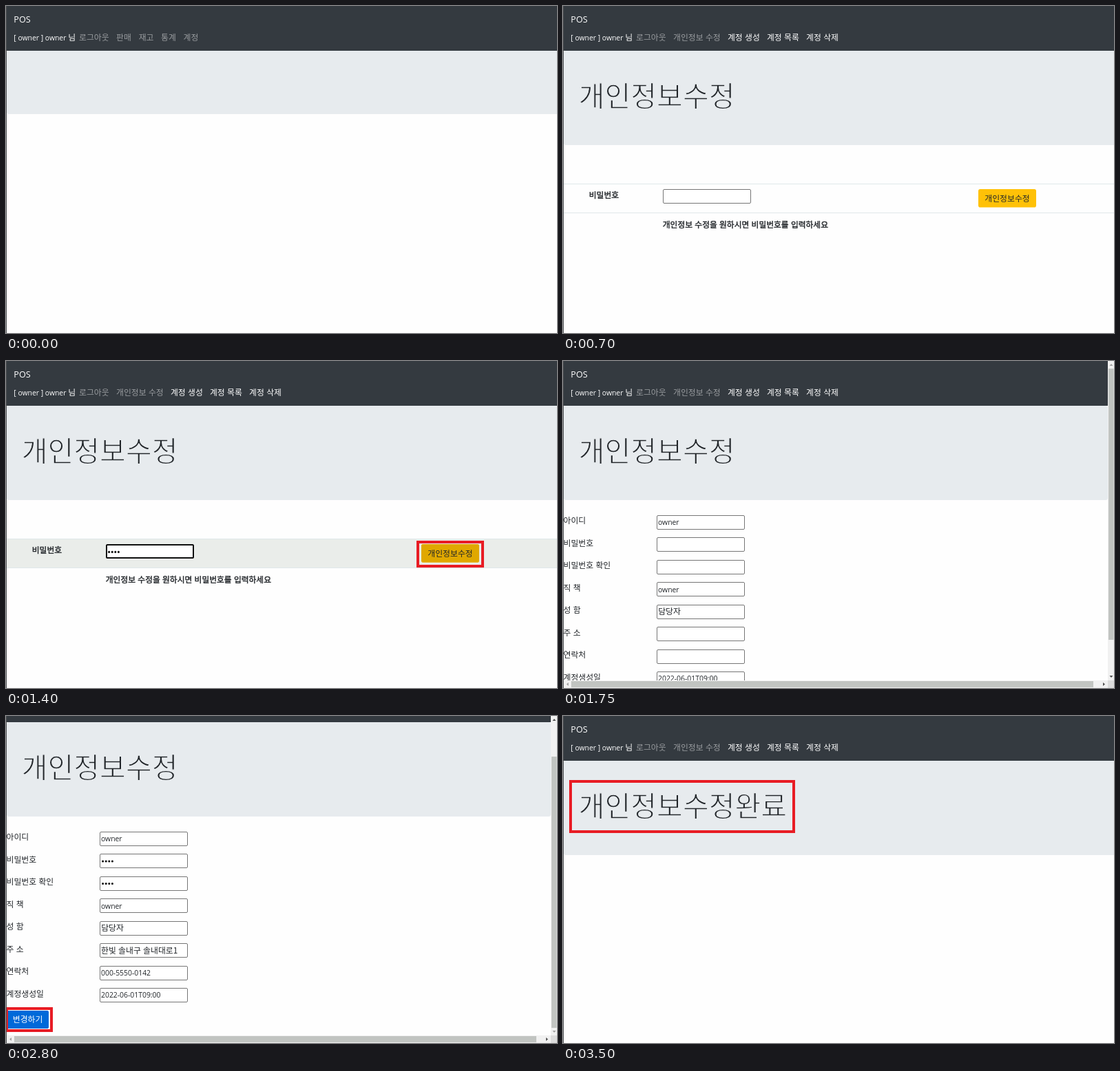
Write an HTML page that moves like this. It is 800x475 px and loops after 3.85 s.

```html
<!DOCTYPE html>
<html lang="ko">
<head>
<meta charset="utf-8">
<title>POS</title>
<style>
  html, body { margin: 0; width: 100%; height: 100%; overflow: hidden; background: #fefefe; }
  svg { display: block; width: 100vw; height: 100vh; }
  text { font: 11.85px "Noto Sans CJK KR", "Noto Sans CJK", sans-serif; fill: #212529; white-space: pre; }
  .la { font: 10.4px "Open Sans", "Noto Sans", sans-serif; }
  .brand { font-size: 12.6px; }
  .white, .link { fill: #fff; }
  .dim { fill: #999c9f; }
  .bold { font-size: 11.75px; stroke: #212529; stroke-width: .4; }
  /* a stroke in the panel colour thins the letters */
  .title { font-size: 41.1px; stroke: #e7ebee; stroke-width: 1.3; }
  .bar { fill: #343a40; }
  .hero { fill: #e7ebee; }
  .field { fill: #fff; stroke: #767676; }
  .focus { fill: #fff; stroke: #101010; stroke-width: 2; }
  .dots { fill: none; stroke: #111; stroke-width: 3.1; stroke-linecap: round; stroke-dasharray: 0 4.6; }
  .mark { fill: none; stroke: #e81c24; stroke-width: 4; }
  .rule { stroke: #dfe8ea; }
  .track { fill: #f1f1f1; }
  .thumb { fill: #c1c4c1; }
  .off { fill: #a3a3a3; }
  .on { fill: #505050; }

  /* --s: first step shown; the class sets how many 350 ms steps it stays */
  .n1, .n2, .n3, .n4 {
    animation: n1 3850ms step-end infinite;
    animation-delay: calc((var(--s) - 11) * 350ms);
  }
  .n2 { animation-name: n2; }
  .n3 { animation-name: n3; }
  .n4 { animation-name: n4; }
  @keyframes n1 { 0% { opacity: 1 } 9.0909%, 100% { opacity: 0 } }
  @keyframes n2 { 0% { opacity: 1 } 18.1818%, 100% { opacity: 0 } }
  @keyframes n3 { 0% { opacity: 1 } 27.2727%, 100% { opacity: 0 } }
  @keyframes n4 { 0% { opacity: 1 } 36.3636%, 100% { opacity: 0 } }

  .page { animation: scroll 3850ms step-end infinite; }
  .grip { animation: grip 3850ms step-end infinite; }
  @keyframes scroll { 0% { transform: translateY(0) } 54.5454%, 100% { transform: translateY(-56px) } }
  @keyframes grip { 0% { transform: translateY(0) } 54.5454%, 100% { transform: translateY(48px) } }
</style>
</head>
<body>
<svg viewBox="0 0 800 475" preserveAspectRatio="none">
  <defs>
    <g id="head">
      <rect class="bar" width="800" height="65"/>
      <text class="la brand white" x="11.3" y="24">POS</text>
      <text class="la white" x="11.3" y="49.5">[ owner ] owner</text>
      <text class="white" x="90.3" y="50.3">님</text>
      <text class="dim" x="106" y="50.3">로그아웃</text>
    </g>
    <g id="menu">
      <use href="#head"/>
      <text class="dim" x="160" y="50.3">개인정보 수정</text>
      <text class="link" x="238.9" y="50.3">계정 생성</text>
      <text class="link" x="295.9" y="50.3">계정 목록</text>
      <text class="link" x="353.1" y="50.3">계정 삭제</text>
    </g>
    <rect id="box" class="field" x=".5" y=".5" width="127" height="20" rx="1.5"/>
    <path id="pin" class="dots" d="M0 0h14"/>
    <clipPath id="view"><rect width="791" height="464"/></clipPath>
  </defs>

  <rect width="800" height="475" fill="#fefefe"/>

  <!-- home -->
  <g class="n2" style="--s:0">
    <use href="#head"/>
    <text class="dim" x="160" y="50.3">판매</text>
    <text class="dim" x="192.7" y="50.3">재고</text>
    <text class="dim" x="225" y="50.3">통계</text>
    <text class="dim" x="257.5" y="50.3">계정</text>
    <rect class="hero" x="1" y="65" width="802" height="92" rx="3"/>
    <rect class="mark n1" style="--s:1" x="251" y="35" width="35" height="23"/>
  </g>

  <!-- password check -->
  <g class="n3" style="--s:2">
    <use href="#menu"/>
    <rect class="hero" x="1" y="65" width="802" height="137" rx="3"/>
    <text class="title" x="22.7" y="146">개인정보수정</text>
    <rect class="n2" style="--s:3" x="1" y="258" width="799" height="42.5" fill="#eaedea"/>
    <path class="rule" d="M1 258.5h799M1 300.5h799"/>
    <text class="bold" x="37.8" y="279">비밀번호</text>
    <text class="bold" x="144.8" y="321.5">개인정보 수정을 원하시면 비밀번호를 입력하세요</text>
    <use href="#box" x="145" y="266"/>
    <g class="n2" style="--s:3">
      <rect class="focus" x="146" y="267" width="126" height="19" rx="1.5"/>
      <use href="#pin" x="149.6" y="277.4"/>
    </g>
    <rect x="603" y="266" width="84" height="26.5" rx="2.8" fill="#ffc107"/>
    <rect class="n1" style="--s:4" x="603" y="266" width="84" height="26.5" rx="2.8" fill="#e0a800"/>
    <text x="612.3" y="283.7">개인정보수정</text>
    <rect class="mark n1" style="--s:3" x="130" y="260" width="157" height="34"/>
    <rect class="mark n1" style="--s:4" x="598" y="263" width="94" height="35"/>
  </g>

  <!-- edit form -->
  <g class="n4" style="--s:5">
    <g clip-path="url(#view)">
      <g class="page">
        <use href="#menu"/>
        <rect class="hero" x="1" y="65" width="790" height="137" rx="3"/>
        <text class="title" x="22.7" y="146">개인정보수정</text>
        <text x=".5" y="236.4">아이디</text>
        <text x=".5" y="268.8">비밀번호</text>
        <text x=".5" y="301.3">비밀번호 확인</text>
        <text x=".5" y="333.7">직 책</text>
        <text x=".5" y="366.2">성 함</text>
        <text x=".5" y="398.6">주 소</text>
        <text x=".5" y="431.1">연락처</text>
        <text x=".5" y="463.5">계정생성일</text>
        <use href="#box" x="136" y="224"/>
        <use href="#box" x="136" y="256"/>
        <use href="#box" x="136" y="289"/>
        <use href="#box" x="136" y="321"/>
        <use href="#box" x="136" y="354"/>
        <use href="#box" x="136" y="386"/>
        <use href="#box" x="136" y="419"/>
        <use href="#box" x="136" y="451"/>
        <text class="la" x="138" y="238.2">owner</text>
        <text class="la" x="138" y="335.5">owner</text>
        <text x="138.2" y="368.4">담당자</text>
        <text class="la" x="138" y="465.3">2022-06-01T09:00</text>
        <g class="n2" style="--s:7">
          <use href="#pin" x="140.6" y="267"/>
          <use href="#pin" x="140.6" y="299.5"/>
          <text x="138" y="400.8">한빛 솔내구 솔내대로1</text>
          <text class="la" x="138" y="433">000-5550-0142</text>
        </g>
        <rect x="1" y="484" width="61" height="26" rx="2.8" fill="#007bff"/>
        <rect class="n1" style="--s:8" x="1" y="484" width="61" height="26" rx="2.8" fill="#0069d9"/>
        <text class="white" x="9.8" y="500.9">변경하기</text>
      </g>
    </g>
    <rect class="mark n1" style="--s:7" x="126" y="193" width="148" height="197"/>
    <rect class="mark n1" style="--s:8" x="1" y="425" width="65" height="32"/>

    <path class="track" d="M791 0h9v464h-9zM0 464h791v11H0z"/>
    <rect x="791" y="464" width="9" height="11" fill="#dcdcdc"/>
    <rect class="thumb grip" x="792" y="11" width="7.5" height="394"/>
    <rect class="thumb" x="12" y="465" width="758" height="9"/>
    <g class="n1" style="--s:5">
      <path class="off" d="M793.5 7l2.5-3 2.5 3z"/>
      <path class="on" d="M793.5 457l2.5 3 2.5-3z"/>
    </g>
    <g class="n3" style="--s:6">
      <path class="on" d="M793.5 7l2.5-3 2.5 3z"/>
      <path class="off" d="M793.5 457l2.5 3 2.5-3z"/>
    </g>
    <path class="off" d="M8 467l-3 2.5 3 2.5z"/>
    <path class="on" d="M784 467l3 2.5-3 2.5z"/>
  </g>

  <!-- done -->
  <g class="n2" style="--s:9">
    <use href="#menu"/>
    <rect class="hero" x="1" y="65" width="802" height="137" rx="3"/>
    <text class="title" x="22.7" y="146">개인정보수정완료</text>
    <rect class="mark n1" style="--s:10" x="11" y="95" width="324" height="73"/>
  </g>

  <rect width="1" height="475" fill="#4d4f52"/>
</svg>
</body>
</html>
```
